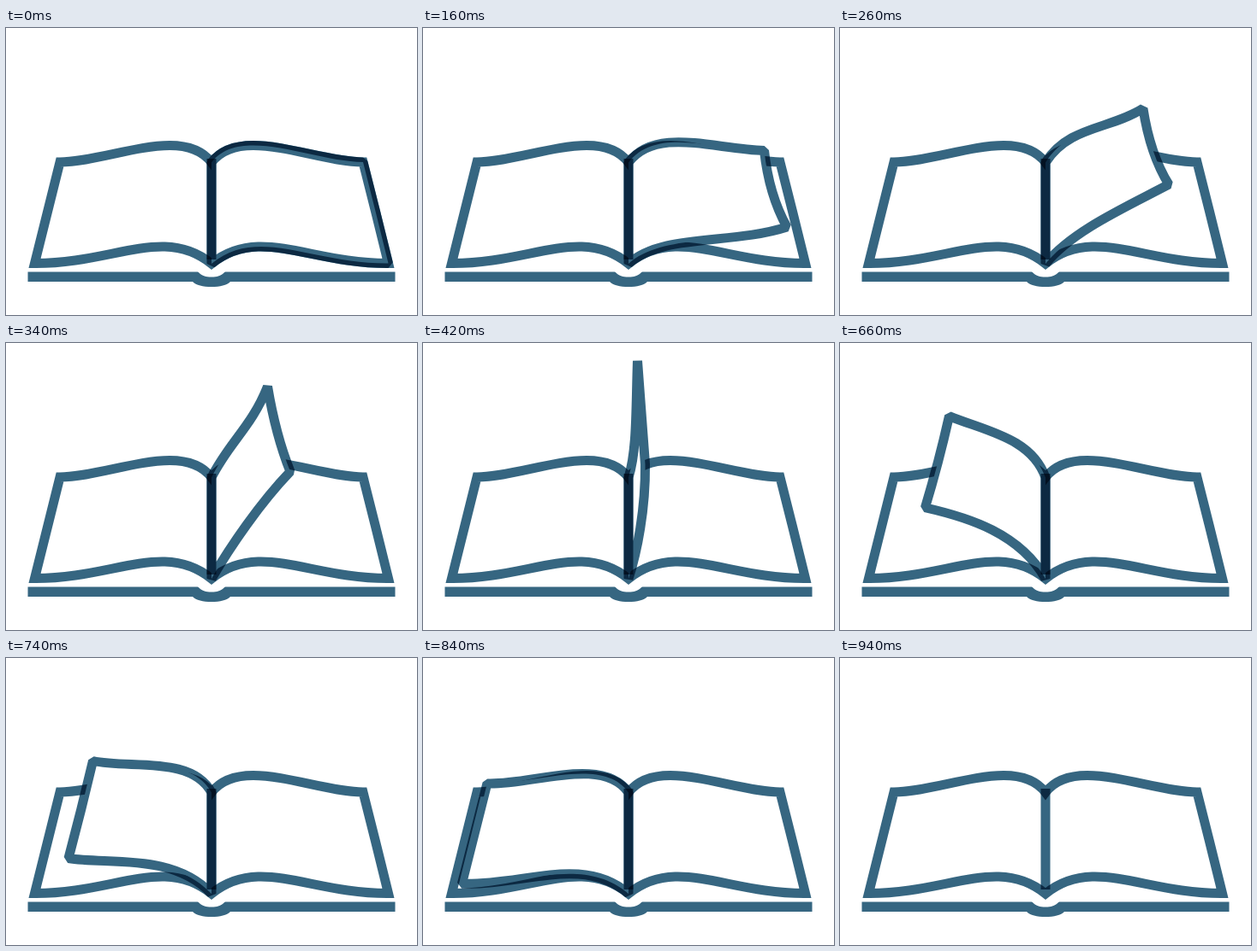
These frames come from a looping animation (480 px wide and 336 px high, 0.96 s). An HTML page with a canvas:

```html
<!DOCTYPE html>
<html lang="en">
<head>
<meta charset="utf-8">
<title>Turning page</title>
<style>
  html, body { margin: 0; width: 100%; height: 100%; overflow: hidden; background: #fff; }
  canvas { display: block; width: 480px; height: 336px; }
</style>
</head>
<body>
<canvas id="stage" width="480" height="336"></canvas>
<script>
const ctx = document.getElementById('stage').getContext('2d');
const INK = '#366681';
const LOOP = 960, STEP = 20, END = 940;
const TOP = [240, 157.5], FOOT = [240, 276];

// Page pose: top controls (2), upper corner, side control, lower corner, bottom controls (2)
const flat = [274, 113, 360, 157, 417, 157, 432, 216, 446.5, 275.5, 355, 276, 295, 231];
const mirror = pose => pose.map((v, i) => i % 2 ? v : 480 - v);
const flatLeft = mirror(flat);

const keys = [
  [0, flat],
  [160, [272, 115, 340, 142, 398.5, 143.5, 404, 195, 425, 233, 360, 254, 280, 240]],
  [340, [260, 117, 287, 98, 305.5, 51, 315, 108, 332, 150.5, 297, 187, 262, 238]],
  [420, [250, 125, 248.5, 80, 250.5, 21, 255, 80, 259.5, 142, 260, 195, 250, 245]],
  [480, [245, 116, 231, 75, 217, 18.5, 217, 80, 213, 140, 234, 185, 243, 235]],
  [580, [232, 110, 200, 80, 161.3, 49.3, 152, 104, 138, 154.5, 190, 175, 227, 222]],
  [740, [217, 114, 145, 130, 101.5, 120.5, 88, 178, 73, 234.5, 120, 242, 195, 228]],
  [END, flatLeft]
];

// Velocity of value i at key k; the page rests at both ends
function velocity(k, i) {
  if (k === 0 || k === keys.length - 1) return 0;
  const [[t0, a], [t1, b], [t2, c]] = keys.slice(k - 1, k + 2);
  const h0 = t1 - t0, h1 = t2 - t1;
  return ((b[i] - a[i]) / h0 * h1 + (c[i] - b[i]) / h1 * h0) / (h0 + h1);
}

function poseAt(t) {
  let k = 0;
  while (k < keys.length - 2 && t >= keys[k + 1][0]) k++;
  const [t0, a] = keys[k], [t1, b] = keys[k + 1];
  const h = t1 - t0, u = (t - t0) / h, w = 1 - u;
  return a.map((v, i) =>
    v * w * w * (1 + 2 * u) + b[i] * u * u * (1 + 2 * w) +
    h * u * w * (w * velocity(k, i) - u * velocity(k + 1, i)));
}

// Outline of one page from the top of the spine to its foot
function tracePage(path, p) {
  path.bezierCurveTo(...p.slice(0, 6));
  path.quadraticCurveTo(...p.slice(6, 10));
  path.bezierCurveTo(...p.slice(10, 14), ...FOOT);
}

function pagePath(p) {
  const path = new Path2D();
  path.moveTo(...TOP);
  tracePage(path, p);
  path.closePath();
  return path;
}

function bookPath() {
  const path = new Path2D(), l = flatLeft;
  path.moveTo(...TOP);
  tracePage(path, flat);
  path.bezierCurveTo(l[12], l[13], l[10], l[11], l[8], l[9]);
  path.lineTo(l[4], l[5]);
  path.bezierCurveTo(l[2], l[3], l[0], l[1], ...TOP);
  path.closePath();
  return path;
}

const book = bookPath();
const spine = new Path2D('M240 153V271');
const base = new Path2D(
  'M25.5 285.5H223C227 285.5 226 291.5 240 291.5S253 285.5 257 285.5H454.5V297H262' +
  'C258 301 250 303 240 303S222 301 218 297H25.5Z');

function ink(path, join) {
  ctx.globalCompositeOperation = 'multiply';
  ctx.lineJoin = join;
  ctx.stroke(path);
  ctx.globalCompositeOperation = 'source-over';
}

function draw(t) {
  ctx.fillStyle = '#fff';
  ctx.fillRect(0, 0, 480, 336);
  ctx.strokeStyle = INK;
  ctx.lineWidth = 11;
  ink(book, 'miter');
  if (t < END) {
    const page = pagePath(poseAt(t));
    ctx.fill(page);
    ink(page, 'bevel');
  }
  ink(spine, 'miter');
  ctx.fillStyle = INK;
  ctx.fill(base);
}

const start = performance.now();
function tick() {
  const t = (performance.now() - start) % LOOP;
  draw(Math.floor(t / STEP) * STEP);
  requestAnimationFrame(tick);
}
tick();
</script>
</body>
</html>
```
